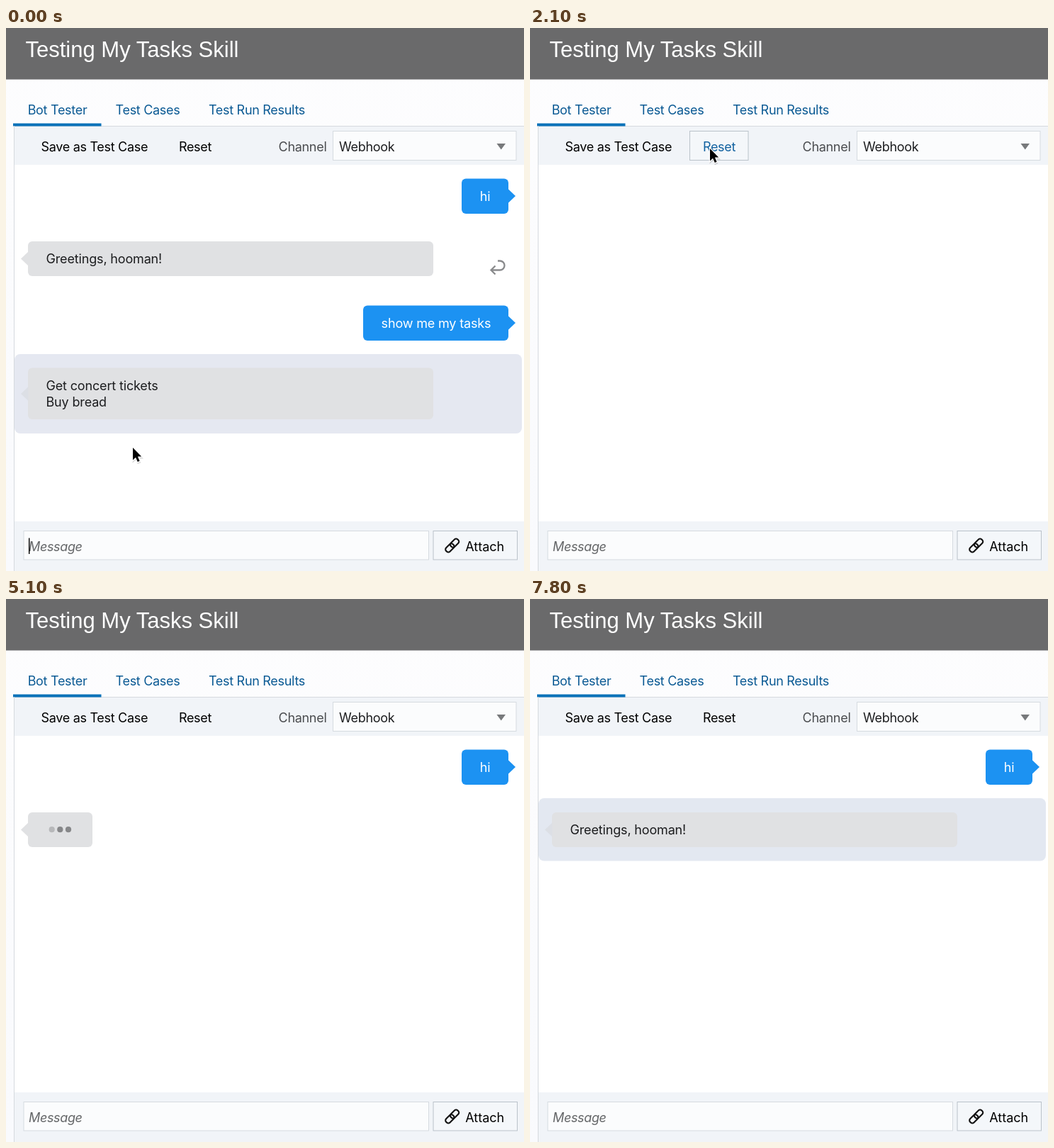
Animation of 731 by 766 pixels, one loop 8 s. Source, as an HTML page:

```html
<!DOCTYPE html>
<html lang="en">
<head>
<meta charset="utf-8">
<title>Testing My Tasks Skill</title>
<style>
html, body { margin: 0; width: 100%; height: 100%; overflow: hidden; background: #fbfcfe; }
svg { display: block; width: 100vw; height: 100vh; }
text { font: 18px Inter, "Open Sans", sans-serif; font-optical-sizing: none; letter-spacing: -.3px; fill: #000; }
.title { font: 31px "Liberation Sans", Arial, sans-serif; letter-spacing: 0; fill: #fff; }
.tab { fill: #0b5a94; }
.mid { text-anchor: middle; }
.chat text { letter-spacing: -.16px; fill: #1c1d1f; }
.chat .me text { fill: #fff; }
.me { fill: #1c92f2; }
.bot { fill: #e0e1e3; }
.panel { fill: #f1f4f8; }
.line { fill: #d6dade; }
.box { fill: #fbfcfd; stroke: #d6dbe0; }
.btn { fill: #f4f7fa; stroke: #bac2ca; }
.hint { font-style: italic; fill: #646668; letter-spacing: -.35px; }

/* One 8 s clock in 300 ms steps (3.75% each). */
.anim { animation: 8s step-end infinite; }
.early { animation-name: early; }
.hi { animation-name: hi; }
.late { animation-name: late; }
.typing { animation-name: typing; }
.hover { animation-name: hover; }
.save { animation-name: save; }
.arrow { animation-name: arrow; }
.beam { animation-name: beam; }
.hint { animation-name: hint; }
.key1 { animation-name: key1; }
.key2 { animation-name: key2; }
.caret { animation-name: caret; }
.d1 { animation-name: d1; }
.d2 { animation-name: d2; }
.d3 { animation-name: d3; }

@keyframes early { 0% { opacity: 1 } 26.25%, 100% { opacity: 0 } }
@keyframes hi { 0%, 63.75%, 100% { opacity: 1 } 26.25% { opacity: 0 } }
@keyframes late { 0% { opacity: 0 } 90%, 100% { opacity: 1 } }
@keyframes typing { 0%, 90%, 100% { opacity: 0 } 63.75% { opacity: 1 } }
@keyframes hover { 0%, 33.75%, 100% { opacity: 0 } 18.75% { opacity: 1 } }
@keyframes save { 0%, 63.75%, 100% { fill: #000 } 30% { fill: #999b9e } }
@keyframes hint { 0%, 63.75%, 100% { opacity: 1 } 56.25% { opacity: 0 } }
@keyframes key1 { 0%, 63.75%, 100% { opacity: 0 } 56.25% { opacity: 1 } }
@keyframes key2 { 0%, 63.75%, 100% { opacity: 0 } 60% { opacity: 1 } }
@keyframes beam { 0%, 56.25%, 100% { opacity: 0 } 41.25% { opacity: 1 } }
@keyframes arrow {
  0% { transform: translate(179px, 592px) }
  7.5% { transform: translate(184px, 560px) }
  11.25% { transform: translate(205px, 430px) }
  15% { transform: translate(236px, 270px) }
  18.75% { transform: translate(253px, 178px) }
  22.5% { transform: translate(254px, 170px) }
  33.75% { transform: translate(246px, 300px) }
  37.5% { transform: translate(214px, 590px); opacity: 1 }
  41.25%, 100% { transform: translate(204px, 736px); opacity: 0 }
}
@keyframes caret {
  0%, 15%, 41.25%, 52.5% { opacity: 1; transform: none }
  7.5%, 22.5%, 48.75% { opacity: 0; transform: none }
  56.25% { opacity: 1; transform: translateX(11px) }
  60% { opacity: 1; transform: translateX(15px) }
  63.75%, 100% { opacity: 0; transform: none }
}
@keyframes d1 { 0%, 63.75%, 75% { opacity: .45 } 67.5%, 78.75% { opacity: 1 } 71.25%, 82.5%, 100% { opacity: .8 } 86.25% { opacity: .45 } }
@keyframes d2 { 0%, 63.75%, 75%, 86.25% { opacity: 1 } 67.5%, 78.75% { opacity: .45 } 71.25%, 82.5%, 100% { opacity: 1 } }
@keyframes d3 { 0%, 63.75%, 75%, 86.25% { opacity: 1 } 67.5%, 78.75% { opacity: 1 } 71.25%, 82.5%, 100% { opacity: .8 } }
</style>
</head>
<body>
<svg viewBox="0 0 731 766">
  <defs>
    <linearGradient id="page" x2="0" y2="1">
      <stop stop-color="#fdfdfe"/><stop offset="1" stop-color="#f9fafd"/>
    </linearGradient>
  </defs>
  <rect width="731" height="766" fill="url(#page)"/>
  <rect width="731" height="72" fill="#6a6a6b"/>
  <rect y="72" width="731" height="1" fill="#a9a9ab"/>
  <text class="title" x="27.5" y="41">Testing My Tasks Skill</text>

  <g class="mid">
    <text class="tab" x="72.5" y="122">Bot Tester</text>
    <text class="tab" x="200" y="122">Test Cases</text>
    <text class="tab" x="354" y="122">Test Run Results</text>
  </g>
  <rect class="line" x="11" y="138" width="720" height="1"/>
  <rect x="10" y="134.5" width="124.5" height="4" fill="#0b72b9"/>

  <rect class="panel" x="12" y="139" width="719" height="54"/>
  <rect x="12" y="193" width="719" height="503" fill="#fff"/>
  <rect class="panel" x="12" y="696" width="719" height="70"/>
  <rect class="line" x="11" y="138" width="1" height="628"/>

  <g class="mid">
    <text class="anim save" x="124.8" y="174">Save as Test Case</text>
    <text x="267" y="174">Reset</text>
    <g class="anim hover">
      <rect class="btn" x="225.5" y="145.5" width="82.5" height="41"/>
      <text x="267" y="174" style="fill:#1262a0">Reset</text>
    </g>
    <text x="418.5" y="174" style="fill:#4a4c4f">Channel</text>
  </g>
  <rect class="box" x="461.5" y="145.5" width="258.5" height="41"/>
  <text x="470" y="174" style="fill:#1c1d1f">Webhook</text>
  <path d="M692.5 163h12.5l-6.25 8.5z" fill="#77797b"/>

  <g class="chat">
    <g class="me anim hi">
      <rect x="643" y="212.5" width="66" height="49.5" rx="6"/>
      <path d="M708.5 227l10.5 10-10.5 10z"/>
      <text class="mid" x="676" y="244">hi</text>
    </g>

    <g class="anim early">
      <g class="bot">
        <rect x="31" y="301" width="572" height="49" rx="6"/>
        <path d="M31.5 315.5l-10.5 10 10.5 10z"/>
        <text x="56.5" y="332">Greetings, hooman!</text>
      </g>
      <path d="M694 328.5h3a6.5 6.5 0 0 1 0 13h-12M690.5 335.5l-6 6 6 6" fill="none" stroke="#8a8b8d" stroke-width="2.3"/>
      <g class="me">
        <rect x="504" y="391.5" width="205" height="49.5" rx="6"/>
        <path d="M708.5 406l10.5 10-10.5 10z"/>
        <text class="mid" x="607" y="423">show me my tasks</text>
      </g>
      <rect x="12" y="460" width="716" height="112" rx="8" fill="#e5e8f1"/>
      <g class="bot">
        <rect x="31" y="479.5" width="572" height="72.5" rx="6"/>
        <path d="M31.5 506l-10.5 10 10.5 10z" fill="#dcdfe5"/>
        <text x="56.5" y="511">Get concert tickets</text>
        <text x="56.5" y="534">Buy bread</text>
      </g>
    </g>

    <g class="bot anim typing">
      <rect x="31" y="301" width="91" height="49" rx="6"/>
      <path d="M31.5 315.5l-10.5 10 10.5 10z"/>
      <g fill="#868789">
        <circle class="anim d1" cx="64.7" cy="325.2" r="4.1"/>
        <circle class="anim d2" cx="76.3" cy="325.2" r="4.1"/>
        <circle class="anim d3" cx="88" cy="325.2" r="4.1"/>
      </g>
    </g>

    <g class="anim late">
      <rect x="12" y="281" width="716" height="88.5" rx="8" fill="#e3e8f1"/>
      <g class="bot">
        <rect x="31" y="301" width="572" height="49" rx="6"/>
        <path d="M31.5 315.5l-10.5 10 10.5 10z" fill="#dcdfe5"/>
        <text x="56.5" y="332">Greetings, hooman!</text>
      </g>
    </g>
  </g>

  <rect class="box" x="25" y="709.5" width="571.5" height="40.5"/>
  <text class="anim hint" x="32" y="738">Message</text>
  <text class="anim key1" x="32" y="738">h</text>
  <text class="anim key2" x="42.5" y="738">i</text>
  <rect class="anim caret" x="32" y="719.5" width="1.4" height="22.5"/>

  <rect class="btn" x="603" y="709.5" width="118.5" height="40.5"/>
  <g transform="translate(629.7 730) rotate(-45)" fill="none" stroke="#111" stroke-width="2.1">
    <rect x="-11.5" y="-3.8" width="13.5" height="7.6" rx="3.2"/>
    <rect x="-2" y="-3.8" width="13.5" height="7.6" rx="3.2"/>
  </g>
  <text class="mid" x="675.7" y="738" style="letter-spacing:0">Attach</text>

  <g class="anim beam" fill="none">
    <path id="ibeam" d="M200 727q4.5 0 4.5 3q0-3 4.5-3M204.5 729v14M200 746q4.5 0 4.5-3q0 3 4.5 3M202 738.5h5" stroke="#fff" stroke-width="3"/>
    <path d="M200 727q4.5 0 4.5 3q0-3 4.5-3M204.5 729v14M200 746q4.5 0 4.5-3q0 3 4.5 3M202 738.5h5" stroke="#111" stroke-width="1.5"/>
  </g>
  <g class="anim arrow">
    <path d="M.5 2v17.5l4-3.7 2.8 6.2 2.8-1.2-2.7-6.2h5.3z" fill="#000" opacity=".15" stroke="#000" stroke-width="2"/>
    <path d="M0 0v17.5l4-3.7 2.8 6.2 2.8-1.2-2.7-6.2h5.3z" stroke="#fff" stroke-width="2.4" paint-order="stroke"/>
  </g>
</svg>
</body>
</html>
```
